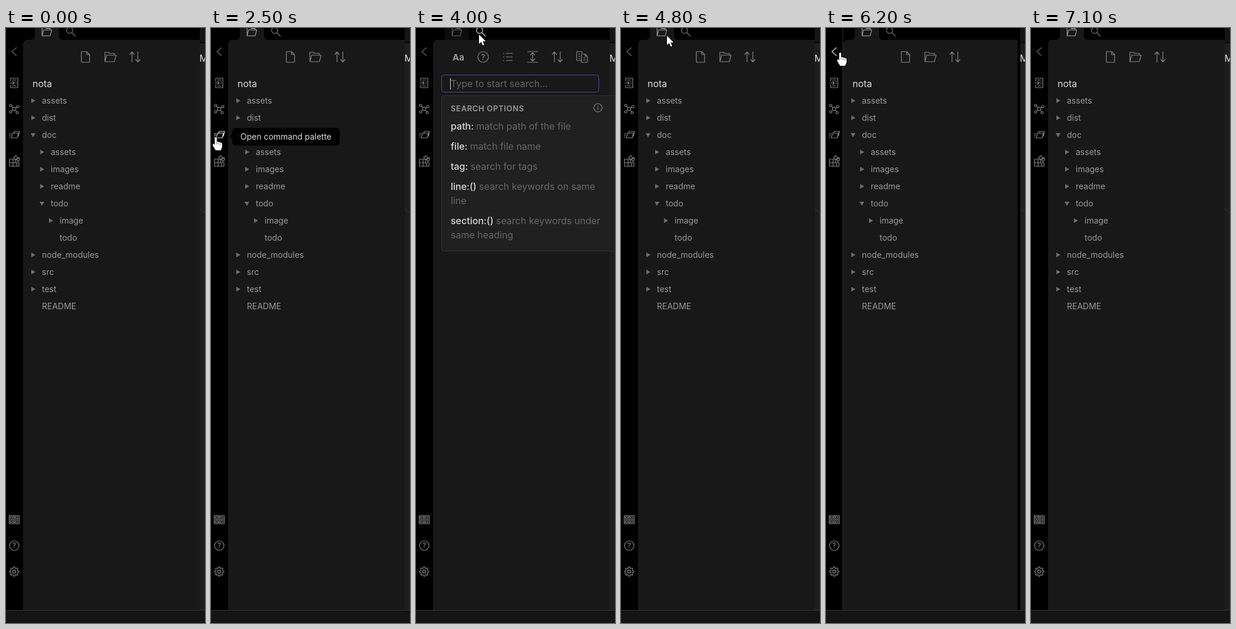
These frames come from a looping animation (338 px wide and 1007 px high, 7.4 s). An HTML page with a canvas:

```html
<!DOCTYPE html>
<html lang="en">
<head>
<meta charset="utf-8">
<title>Sidebar tour</title>
<style>
html, body { margin: 0; width: 338px; height: 1007px; overflow: hidden; background: #000; }
canvas { display: block; }
</style>
</head>
<body>
<canvas id="stage" width="338" height="1007"></canvas>
<script>
const ctx = document.getElementById('stage').getContext('2d');
const LOOP = 7400, STEP = 100;
const PANEL = '#181818', DIM = '#858585', LIT = '#dadada';
const FONT = 'Inter, sans-serif';

// Pointer path: time, x, y of the tip
const PATH = [
  [100, 320, 37], [200, 268, 42], [300, 194, 54], [400, 120, 70], [500, 60, 86], [600, 22, 96], [700, 10, 99],
  [1000, 10, 99], [1100, 15, 106], [1500, 9, 134], [1600, 9, 134], [2100, 6, 179], [2400, 6, 179],
  [2500, 8, 184], [2600, 32, 208], [2700, 74, 236], [2800, 112, 246], [2900, 138, 218],
  [3000, 148, 160], [3100, 147, 92], [3200, 138, 39], [3300, 126, 28], [3600, 107, 11],
  [4000, 107, 11], [4500, 78, 13], [4800, 78, 13], [5100, 107, 12], [5200, 107, 12],
  [5400, 76, 13], [5500, 76, 13], [6000, 24, 41], [7100, 24, 41]
];

// Tooltips: from, to, text, anchor x, anchor y, below the anchor?
const TIPS = [
  [600, 1300, 'Open quick switcher', 32, 96],
  [1300, 1900, 'Open graph view', 32, 140],
  [1900, 2600, 'Open command palette', 32, 184],
  [3500, 4000, 'Search', 110, 24, true],
  [4300, 4800, 'File explorer', 70, 24, true],
  [5000, 5200, 'Search', 110, 24, true],
  [5400, 5500, 'File explorer', 70, 24, true],
  [5900, 6200, 'Collapse', 32, 40]
];

// Tree rows: label, depth, state (1 closed, 2 open, 0 file)
const TREE = [
  ['assets', 0, 1], ['dist', 0, 1], ['doc', 0, 2], ['assets', 1, 1], ['images', 1, 1],
  ['readme', 1, 1], ['todo', 1, 2], ['image', 2, 1], ['todo', 2, 0],
  ['node_modules', 0, 1], ['src', 0, 1], ['test', 0, 1], ['README', 0, 0]
];

const OPTIONS = [
  ['path:', 'match path of the file', 166],
  ['file:', 'match file name', 200],
  ['tag:', 'search for tags', 234],
  ['line:()', 'search keywords on same', 268, 'line'],
  ['section:()', 'search keywords under', 326, 'same heading']
];

function rect(x, y, w, h, color) {
  ctx.fillStyle = color;
  ctx.fillRect(x, y, w, h);
}

function box(x, y, w, h, r, fill, stroke) {
  ctx.beginPath();
  ctx.roundRect(x, y, w, h, r);
  if (fill) { ctx.fillStyle = fill; ctx.fill(); }
  if (stroke) { ctx.strokeStyle = stroke; ctx.lineWidth = 1; ctx.stroke(); }
}

function text(str, x, y, size, color, weight = 400, spacing = '0px') {
  ctx.font = `${weight} ${size}px ${FONT}`;
  ctx.letterSpacing = spacing;
  ctx.fillStyle = color;
  ctx.textBaseline = 'alphabetic';
  ctx.fillText(str, x, y + size * 0.364);
  const width = ctx.measureText(str).width;
  ctx.letterSpacing = '0px';
  return width;
}

// Strokes an SVG path around a centre point
function icon(x, y, d, color = DIM, width = 1.2) {
  ctx.save();
  ctx.translate(x, y);
  ctx.strokeStyle = color;
  ctx.lineWidth = width;
  ctx.lineJoin = 'round';
  ctx.stroke(new Path2D(d));
  ctx.restore();
}

const circle = (x, y, r) => `M${x + r} ${y}a${r} ${r} 0 1 0 ${-2 * r} 0a${r} ${r} 0 1 0 ${2 * r} 0`;

const ICONS = {
  back: 'M4-7L-4 0L4 7',
  next: 'M-4-7L4 0L-4 7',
  switcher: 'M-5-3V-8H7V8H-5V3M-7 0H1M-2-3L1 0L-2 3M-2-5H4M3-2H5M3 1H5M-2 5H4',
  graph: circle(0, 0, 2.8) + circle(-6, -6, 2) + circle(6, -4, 2) + circle(-6, 5, 2) + circle(5, 6, 2) +
    'M-4.5-4.5L-2-2M2.5-1L4-3M-2.5 1.5L-4.5 4M2 2L4 4.5',
  palette: 'M-3-3H7L5 5H-5ZM-1-3L0-6H9L7 2H6M-9-2H-5M-9 1H-6M-9 4H-7',
  blocks: 'M-8-3H-2V3H-8ZM-8 3H-2V9H-8ZM-2 3H4V9H-2ZM4 3H8V9H4M-2-3H2V3M-1-6L3-9L6-5L2-2ZM4-2L8-6L9-2L6 1Z',
  vault: 'M-8.5-7H8.5V7H-8.5ZM-6-5H6V5H-6ZM-8.5-4H-6M-8.5 4H-6' + circle(0, 0, 4) + circle(0, 0, 1.6),
  file: 'M-7-9H2L7-4V9H-7ZM2-9V-4H7',
  folder: 'M-9 8V-8H-3L-1-6H7V-3M-9 8L-6-3H10L7 8Z',
  sort: 'M-5 9V-8M-9-4L-5-8.5L-1-4M5-9V8M1 4L5 8.5L9 4',
  list: 'M-3-6H8M-3 0H8M-3 6H8M-8-6H-6M-8 0H-6M-8 6H-6',
  fold: 'M-9-9H9M-9 9H9M0-6V6M-4-3L0-7L4-3M-4 3L0 7L4 3',
  copy: 'M-1 6H-9V-9H-1L1-7M-1-5H5L9-1V9H-1ZM5-5V-1H9M-6-5H-3M-6-1H-3M-6 3H-3M2 2H6M2 5H6',
  glass: circle(-2, -2, 5.2) + 'M2 2L8 8'
};

function gearPath() {
  let d = '';
  for (let i = 0; i < 32; i++) {
    const a = (i - 0.5) * Math.PI / 16, r = i % 4 < 2 ? 8 : 5.9;
    d += `${i ? 'L' : 'M'}${(r * Math.cos(a)).toFixed(2)} ${(r * Math.sin(a)).toFixed(2)}`;
  }
  return d + 'Z' + circle(0, 0, 2.7);
}
ICONS.gear = gearPath();

function badge(x, y, r, sign) {
  icon(x, y, circle(0, 0, r));
  ctx.textAlign = 'center';
  text(sign, x, y, r * 1.45, DIM, 500);
  ctx.textAlign = 'left';
}

function pointerAt(t) {
  if (t < PATH[0][0] || t >= 7100) return null;
  const i = PATH.findIndex(p => p[0] > t);
  const [t0, x0, y0] = PATH[i - 1], [t1, x1, y1] = PATH[i];
  const k = (t - t0) / (t1 - t0);
  return { x: x0 + (x1 - x0) * k, y: y0 + (y1 - y0) * k };
}

// Sidebar width: 300 open, 0 collapsed
function panelWidth(t) {
  const ease = k => k * k * (3 - 2 * k);
  if (t < 6200 || t >= 7100) return 300;
  if (t < 6500) return 300 - 300 * ease((t - 6180) / 320);
  if (t < 6800) return 0;
  return 300 * ease((t - 6780) / 320);
}

function drawRibbon(t, p) {
  rect(0, 0, 29, 985, '#000');
  const lit = y => p && p.x < 29 && Math.abs(p.y - y) < 21 ? LIT : DIM;
  const collapsed = t >= 6500 && t < 6800;
  icon(14, 40, collapsed ? ICONS.next : ICONS.back, p && p.x < 29 && p.y < 60 ? LIT : '#666');
  icon(13, 93, ICONS.switcher, lit(98));
  icon(14, 137, ICONS.graph, lit(140));
  icon(14, 181, ICONS.palette, lit(182));
  icon(14, 225, ICONS.blocks);
  icon(14, 832, ICONS.vault);
  badge(14, 876, 8, '?');
  icon(14, 920, ICONS.gear);
}

function drawEditor(x) {
  ctx.save();
  ctx.beginPath();
  ctx.rect(x, 0, 338 - x, 985);
  ctx.clip();
  rect(x, 0, 338, 985, '#1e1e1e');
  rect(x, 0, 338, 24, '#151515');
  rect(x, 24, 338, 1.5, '#000');
  text('Markdown', x - 0.5, 51, 16, LIT);
  icon(x, 306, 'M0 0L10 8', '#343434', 1);
  ctx.restore();
}

function drawTab(x0, x1, color) {
  ctx.fillStyle = color;
  ctx.fill(new Path2D(`M${x0 - 7} 20Q${x0} 20 ${x0} 13V0H${x1}V13Q${x1} 20 ${x1 + 7} 20Z`));
}

function drawTree(p) {
  icon(135, 49, ICONS.file);
  icon(177, 49, ICONS.folder);
  icon(219, 49, ICONS.sort);
  text('nota', 45, 94, 16, LIT);
  TREE.forEach(([label, depth, state], i) => {
    const y = 123 + 29 * i, x = 46 + 15 * depth;
    const hover = p && p.x > 33 && p.x < 325 && Math.abs(p.y - y) < 14.5;
    if (hover) box(33, y - 14, 292, 28, 3, '#202020');
    ctx.fillStyle = '#6c6c6c';
    if (state === 1) ctx.fill(new Path2D(`M${x - 3} ${y - 4}L${x + 4} ${y}L${x - 3} ${y + 4}Z`));
    if (state === 2) ctx.fill(new Path2D(`M${x - 4} ${y - 3}H${x + 4}L${x} ${y + 4}Z`));
    text(label, x + 15, y, 14, hover ? LIT : '#999');
  });
}

function drawSearch() {
  text('Aa', 62, 49.5, 15, '#999', 700);
  badge(114, 49, 9, '?');
  icon(156, 49, ICONS.list);
  icon(198, 49, ICONS.fold);
  icon(240, 49, ICONS.sort);
  icon(282, 49, ICONS.copy);
  box(43.5, 79.5, 267, 29, 4, '#181818', '#5540a6');
  text('Type to start search...', 59, 94.5, 16, '#666');
  rect(58, 85, 1, 19, LIT);
  box(43.5, 114.5, 310, 263, 4, '#202020', '#343434');
  text('SEARCH OPTIONS', 59, 136, 13, '#999', 600, '0.65px');
  badge(309, 135, 7, 'i');
  for (const [key, note, y, more] of OPTIONS) {
    const w = text(key + ' ', 59, y, 16, LIT, 500);
    text(note, 59 + w, y, 16, '#666');
    if (more) text(more, 59, y + 24, 16, '#666');
  }
}

function drawPanel(t, p, searching) {
  const edge = 29 + panelWidth(t), moving = edge < 329;
  const gap = moving ? Math.min(4, edge - 29) : 0;
  drawEditor(edge + gap);
  ctx.save();
  ctx.beginPath();
  ctx.rect(29, 0, searching ? 309 : edge - 29, 985);
  ctx.clip();
  rect(29, 0, edge - 29, 985, '#000');
  box(29, 20, edge - 29, 965, [7, 0, 0, 0], PANEL);
  const switching = t === 4000;
  if (switching) rect(49, 0, 41, 20, '#0d0d0d');
  else if (searching) drawTab(90, 131, PANEL);
  else drawTab(49, 90, PANEL);
  const over = (a, b) => p && p.y < 20 && p.x > a && p.x < b;
  ctx.save();
  ctx.translate(69, 6);
  ctx.scale(0.86, 0.9);
  icon(0, 0, ICONS.folder, !searching || over(49, 90) ? '#aaa' : '#666');
  ctx.restore();
  icon(110, 6, ICONS.glass, over(90, 131) ? LIT : searching ? '#aaa' : '#777');
  searching ? drawSearch() : drawTree(p);
  ctx.restore();
  if (moving) rect(28, 0, 1, 985, '#2c2c2c');
}

function drawTip([, , label, x, y, below]) {
  ctx.font = `400 14px ${FONT}`;
  const w = ctx.measureText(label).width + 28;
  const left = below ? x - w / 2 : x + 4, top = below ? y + 4 : y - 15;
  box(left, top, w, 30, 6, 'rgba(0,0,0,.94)');
  ctx.fill(new Path2D(below ? `M${x - 5} ${y + 4}L${x} ${y}L${x + 5} ${y + 4}Z`
                            : `M${x + 4} ${y - 5}L${x} ${y}L${x + 4} ${y + 5}Z`));
  text(label, left + 14, top + 15, 14, LIT);
}

const ARROW = new Path2D('M0 0V16L3.8 12.6L6.4 18.6L9 17.5L6.4 11.6H11.5Z');
const HAND = new Path2D('M-1.6 2Q0-1.2 1.8 2V8.5Q4 7.6 5 9.2Q7 8.4 8 10.2Q10.8 9.6 11 12.5V17L8.6 23H0L-4.6 15.5Q-5.6 12.2-3.4 12L-1.6 14Z');

function drawPointer({ x, y }) {
  const shape = x < 29 ? HAND : ARROW;
  ctx.save();
  ctx.translate(x, y);
  ctx.lineJoin = 'round';
  ctx.lineWidth = 1.6;
  ctx.strokeStyle = '#000';
  ctx.stroke(shape);
  ctx.fillStyle = '#fff';
  ctx.fill(shape);
  if (shape === HAND) icon(0, 0, 'M1.8 9V13M5 10V13.5M8 11V14', '#555', 0.8);
  ctx.restore();
}

function draw(now) {
  const t = Math.floor((now % LOOP) / STEP) * STEP;
  const p = pointerAt(t);
  const searching = (t >= 4000 && t < 4800) || (t >= 5200 && t < 5500);
  rect(0, 0, 338, 1007, '#000');
  drawRibbon(t, p);
  drawPanel(t, p, searching);
  rect(0, 985, 338, 22, '#141414');
  rect(0, 985, 338, 1, '#343434');
  TIPS.filter(tip => t >= tip[0] && t < tip[1]).forEach(drawTip);
  if (p) drawPointer(p);
}

const start = performance.now();
function tick() {
  draw(performance.now() - start);
  requestAnimationFrame(tick);
}
tick();
</script>
</body>
</html>
```
